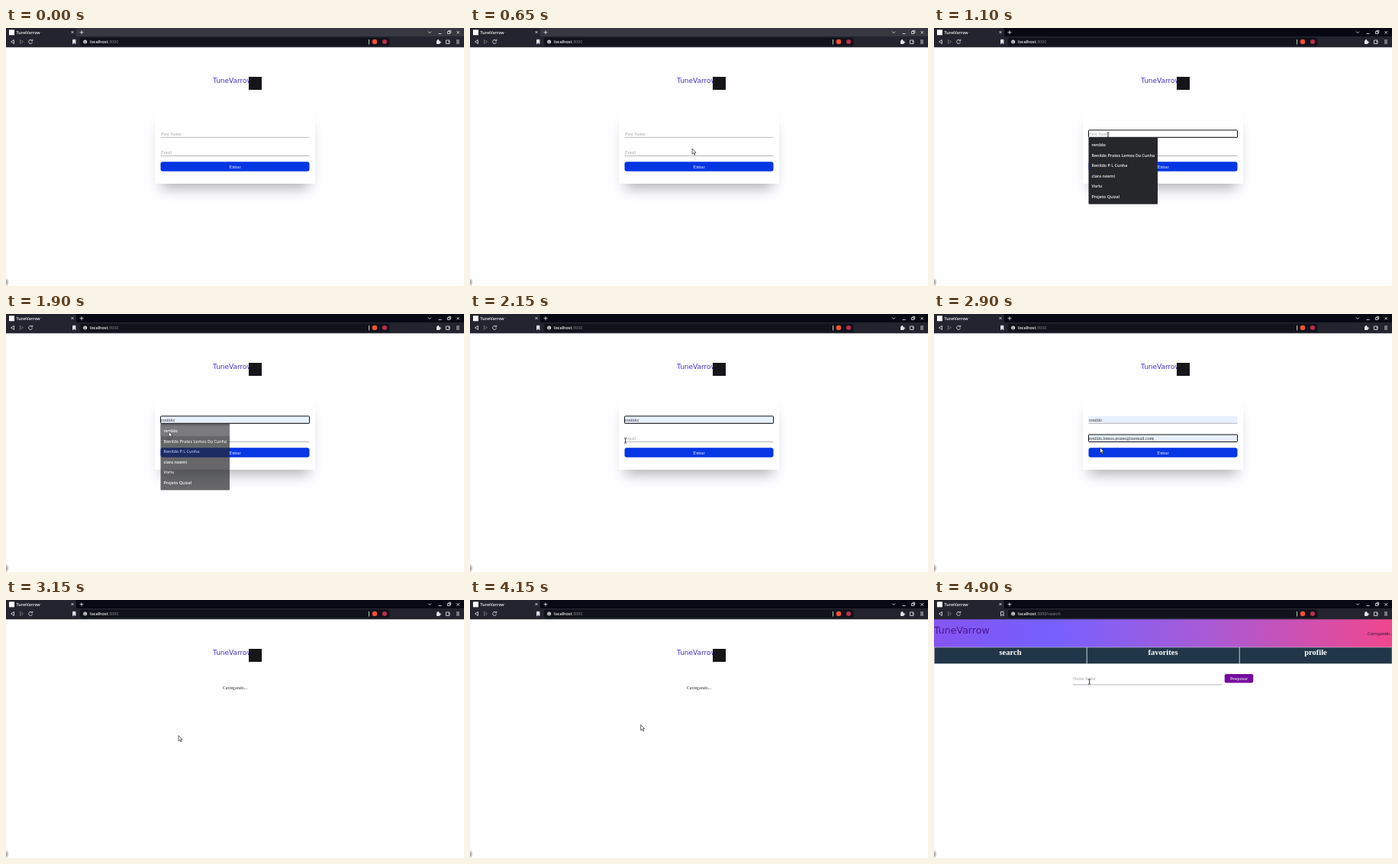
Animation, 600 px wide and 338 px high, one loop 5 s. Source, as an HTML page:

```html
<!DOCTYPE html>
<html lang="pt">
<head>
<meta charset="utf-8">
<title>TuneVarrow</title>
<style>
  html, body { margin: 0; width: 100%; height: 100%; overflow: hidden; background: #fefdff; }
  svg { display: block; width: 100%; height: 100%; }
  text { font: 600 5.4px "Open Sans", sans-serif; fill: #f4f4f6; }
  .serif { font: 6px "Liberation Serif", serif; fill: #333; }
  .hint { fill: #a6a6a8; }
  .light { fill: #fff; }
  .brand { font: 9px "DejaVu Sans", sans-serif; fill: #4436c4; }
  .nav { font: bold 10.5px "Liberation Serif", serif; fill: #fff; }
  .mid { text-anchor: middle; }
  .icon { fill: none; stroke: #d8d8de; stroke-width: .9; }
  .solid { fill: #e4e4ea; }
  .line { stroke: #a2a2a6; stroke-width: .8; }
</style>
</head>
<body>
<svg viewBox="0 0 600 338">
  <defs>
    <linearGradient id="banner">
      <stop offset="0" stop-color="#8655f0"/>
      <stop offset=".25" stop-color="#7560ff"/>
      <stop offset=".6" stop-color="#a95bd6"/>
      <stop offset="1" stop-color="#f0468c"/>
    </linearGradient>
    <radialGradient id="smudge">
      <stop offset="0" stop-color="#888"/>
      <stop offset="1" stop-color="#888" stop-opacity="0"/>
    </radialGradient>
    <filter id="blur" x="-30%" y="-60%" width="160%" height="220%"><feGaussianBlur stdDeviation="9"/></filter>
  </defs>
  <rect width="600" height="338" fill="#fefdff"/>
  <ellipse cx="0" cy="333" rx="4" ry="6" fill="url(#smudge)"/>

  <g id="logo">
    <text class="brand" x="271" y="72">TuneVarrow</text>
    <rect x="326" y="65" width="17" height="17" fill="#15151a" transform="translate(-9 -1)" id="mark"/>
  </g>

  <g id="form">
    <rect x="203" y="128" width="194" height="82" fill="#000" opacity=".3" filter="url(#blur)"/>
    <rect x="195" y="111" width="210" height="93" fill="#fff"/>
    <g id="fields"></g>
    <rect x="202.5" y="175.3" width="195" height="12.4" rx="3" fill="#0536e4"/>
    <text class="serif light mid" x="300" y="183.5">Entrar</text>
    <g id="lists"></g>
  </g>

  <text id="loading" class="serif mid" x="300" y="116.5">Carregando...</text>

  <g id="search">
    <rect y="25" width="600" height="37" fill="url(#banner)"/>
    <text class="brand" x="0" y="44" style="font-size:12.6px;fill:#4b1390">TuneVarrow</text>
    <text class="serif" x="568" y="45.5" style="font-style:italic;fill:#2a1530">Carregando...</text>
    <g id="nav"></g>
    <text class="serif hint" x="182" y="105">Nome Artist</text>
    <path class="line" d="M182 109.5q0 1.5 2 1.5H375q2 0 2-1.5" fill="none"/>
    <rect x="380.7" y="97" width="37.5" height="11.4" rx="2.2" fill="#750a9c"/>
    <text class="serif light mid" x="399.5" y="104.7">Pesquisar</text>
  </g>

  <g id="browser">
    <rect id="tabs" width="600" height="11.5"/>
    <path d="M0 0H90q2 0 2 2V11.5H0z" fill="#23242f"/>
    <rect y="11" width="600" height="14.3" fill="#23242f"/>
    <rect x="97" y="12.6" width="405.5" height="11" rx="2" fill="#11121b"/>
    <rect x="4" y="2.3" width="7" height="7" fill="#fff"/>
    <text x="13.5" y="7.8">TuneVarrow</text>
    <path class="icon" d="M85.5 4l3 3m0-3l-3 3M96.5 5.7h5m-2.5-2.5v5M553 4.6l2 2 2-2M566.5 7.5h4M578.5 4.5h3v3h-3zM580 4.5v-1.200h2.800v3h-1.200M590.500 4l3.500 3.500m0-3.500l-3.500 3.500"/>
    <path class="icon" d="M10.500 15.500v5l-4-2.500zM34 16.300a2.500 2.500 0 1 0 .6 2.200M34.800 14.800v2h-2M475.500 15v6.500"/>
    <path class="icon" d="M18.500 15.500v5l4-2.500z" opacity=".4"/>
    <path id="bookmark" class="icon" d="M87.500 15.300h3.500v5.500l-1.750-1.500-1.750 1.500z"/>
    <circle cx="103.700" cy="18" r="2.500" fill="#d0d0d6"/>
    <path d="M103.700 16.400v.6m0 .7v2" stroke="#11121b" stroke-width=".7"/>
    <text x="110" y="19.900">localhost<tspan id="path" fill="#8d8e98" font-weight="400"></tspan></text>
    <circle cx="483" cy="18" r="3.300" fill="#f0512c"/>
    <circle cx="496" cy="18" r="3" fill="#c22c50"/>
    <path class="solid" d="M564 16.500h1.200a1 1 0 1 1 1.800 0h1.300v1.300a1 1 0 1 1 0 1.800v1.300h-4.300z"/>
    <path class="icon" d="M576.500 16h4.500v4.500h-4.500zM579 18h2.500M590 16h4m-4 2h4m-4 2h4"/>
  </g>

  <path id="arrow" d="M0 0V7.200L1.700 5.700 2.900 8.300 4 7.800 2.900 5.200H5z" fill="#fff" stroke="#222" stroke-width=".7"/>
  <path id="beam" d="M-1.600-3.300Q0-3.300 0-2.300Q0-3.300 1.600-3.300M0-2.500V2.500M-1.600 3.300Q0 3.300 0 2.300Q0 3.300 1.600 3.300" fill="none" stroke="#222" stroke-width=".8"/>
</svg>

<script>
const LOOP = 5000, STEP = 50;
const $ = id => document.getElementById(id);
const show = (el, on) => el.setAttribute('visibility', on ? 'visible' : 'hidden');
const between = (t, a, b) => t >= a && t < b;

const names = ['renildo', 'Renildo Prates Lemos Da Cunha', 'Renildo P L Cunha',
  'clara noemi', 'Vorlu', 'Projeto Quizal'];
const emails = ['renildo.lemos.prates@zurmail.com', 'asdfsadf', 'asdfddsf',
  'renildo.lemos.prate@zurmail.com', 'qwerfd@qwsfrd.com', 'fulano@xolta.com'];

const ROW = 13.5;
const field = (id, y, hint) => `
  <rect id="${id}Fill" x="202.500" y="${y}" width="195" height="9.500" fill="#e8f0fe"/>
  <path class="line" d="M202.500 ${y + 9.5}h195"/>
  <rect id="${id}Focus" x="202.500" y="${y}" width="195" height="9.500" rx="1" fill="none" stroke="#15151a"/>
  <text id="${id}Text" class="serif" x="203" y="${y + 6.7}" data-hint="${hint}"></text>`;
const list = (id, x, y, width, items) => `
  <g id="${id}">
    <rect x="${x}" y="${y}" width="${width}" height="87.500" rx="1" fill="#26272b"/>
    <rect id="${id}Hover" x="${x}" y="${y + 3.2}" width="${width}" height="${ROW}" fill="#414248"/>
    ${items.map((s, i) => `<text x="${x + 4}" y="${y + 12 + i * ROW}">${s}</text>`).join('')}
  </g>`;

$('fields').innerHTML = field('name', 133.8, 'First Name') + field('email', 158, 'Email');
$('lists').innerHTML = list('nameList', 202.5, 143.2, 90.5, names) + list('emailList', 203, 168.6, 104, emails);
$('nav').innerHTML = ['search', 'favorites', 'profile'].map((s, i) => `
  <rect x="${i * 200 + .3}" y="62" width="199.700" height="21.500" fill="#213648" stroke="#c3cbd2" stroke-width=".6"/>
  <text class="nav mid" x="${i * 200 + 100}" y="71.600">${s}</text>`).join('');
$('mark').setAttribute('transform', 'translate(-8 -1)');

// Pointer path: time, x, y
const stops = [
  [150, 5, 258], [650, 291, 158], [1000, 228, 140], [1200, 228, 140],
  [1350, 224, 176], [1450, 214, 153], [1850, 214, 153], [2150, 203.5, 166],
  [2400, 205, 165], [2600, 216, 174.5], [2850, 216, 174.5], [3050, 226, 177.5],
  [3700, 226, 177.5], [3800, 226, 176], [4100, 226, 176], [4150, 223.7, 163.5],
  [4650, 204, 109], [4900, 203.5, 107], [LOOP, 203.5, 107]
];
function pointer(t) {
  const i = Math.max(1, stops.findIndex(s => s[0] > t));
  const [t0, x0, y0] = stops[i - 1], [t1, x1, y1] = stops[i];
  const p = Math.max(0, (t - t0) / (t1 - t0)), k = p * p * (3 - 2 * p);
  return [x0 + (x1 - x0) * k, y0 + (y1 - y0) * k];
}

function drawField(id, value, focused) {
  const text = $(id + 'Text');
  show($(id + 'Fill'), value);
  show($(id + 'Focus'), focused);
  text.textContent = value ? value + (focused ? '|' : '') : text.dataset.hint;
  text.classList.toggle('hint', !value);
}

// A list opens at once and fades out after the click
function drawList(id, t, open, click, row) {
  const opacity = t < open ? 0 : Math.min(1, Math.max(0, 1 - (t - click) / 165));
  $(id).setAttribute('opacity', opacity);
  $(id + 'Hover').setAttribute('transform', `translate(0 ${Math.max(0, row) * ROW})`);
  $(id + 'Hover').setAttribute('opacity', row < 0 ? 0 : 1);
}

function draw(t) {
  const [x, y] = pointer(t);
  const searching = t >= 4700;
  show($('form'), t < 3100);
  $('form').style.display = t < 3100 ? '' : 'none';
  show($('loading'), between(t, 3100, 4700));
  show($('logo'), !searching);
  show($('search'), searching);
  $('tabs').setAttribute('fill', t < 950 ? '#363741' : '#070813');
  $('path').textContent = searching ? ':3000/search' : ':3000';
  $('bookmark').style.fill = searching ? 'none' : '#e4e4ea';

  const nameRow = t >= 1250 && y > 146 ? Math.min(2, Math.floor((y - 146.4) / ROW)) : -1;
  const pickedName = t >= 1850;
  drawField('name', pickedName ? names[0] : t >= 1300 ? names[Math.max(0, nameRow)] : '', between(t, 950, 2250));
  drawField('email', t >= 2500 ? emails[0] : '', between(t, 2250, 2950));
  drawList('nameList', t, 1000, 1850, pickedName ? 0 : nameRow);
  drawList('emailList', t, 2300, 2700, t >= 2500 ? 0 : -1);

  const typing = between(t, 900, 1250) || between(t, 2050, 2450) || searching;
  show($('beam'), typing);
  show($('arrow'), t >= 150 && !typing);
  for (const id of ['beam', 'arrow']) $(id).setAttribute('transform', `translate(${x} ${y})`);
}

function tick() {
  draw(Math.floor(performance.now() % LOOP / STEP) * STEP);
  requestAnimationFrame(tick);
}
tick();
</script>
</body>
</html>
```
